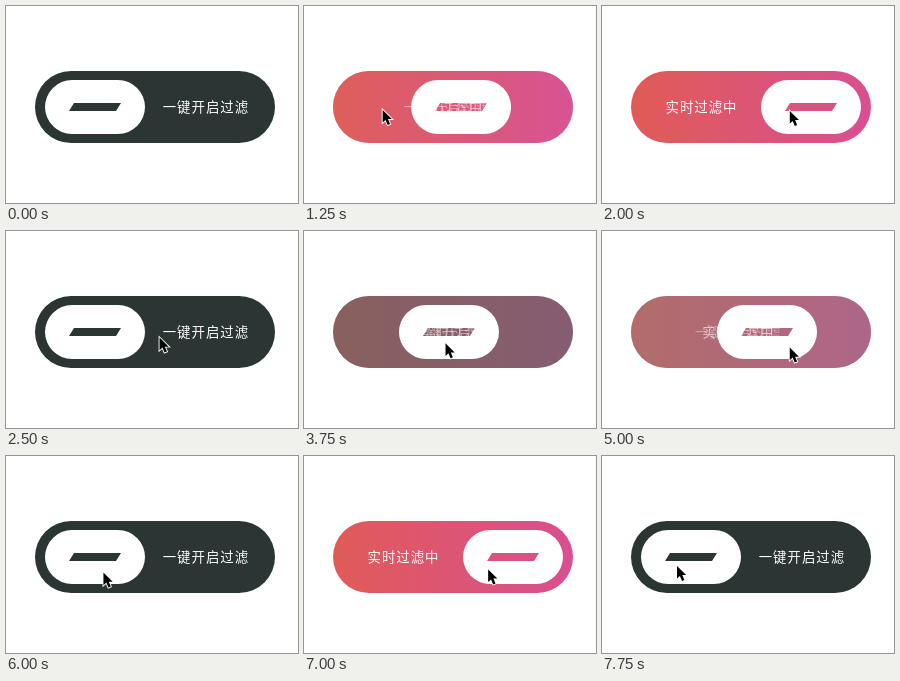
These frames come from a looping animation (292 px wide and 197 px high, 8000 ms). An HTML page:

```html
<!DOCTYPE html>
<html lang="zh-CN">
<head>
<meta charset="utf-8">
<style>
html, body { margin: 0; width: 100%; height: 100%; overflow: hidden; background: #fff; }
svg { display: block; width: 292px; height: 197px; }
text { font: 13.4px "Noto Sans CJK SC", "Noto Sans CJK", sans-serif; letter-spacing: 1px; fill: #fff; text-anchor: middle; }
</style>
</head>
<body>
<svg viewBox="0 0 292 197">
  <defs>
    <linearGradient id="warm">
      <stop stop-color="#e05b57"/>
      <stop offset="1" stop-color="#d94f91"/>
    </linearGradient>
  </defs>
  <rect id="dark" x="29" y="65" width="240" height="72" rx="36" fill="#2b3533"/>
  <rect id="glow" x="29" y="65" width="240" height="72" rx="36" fill="url(#warm)"/>
  <g id="label">
    <text id="offText" y="106.2">一键开启过滤</text>
    <text id="onText" y="106.2">实时过滤中</text>
  </g>
  <!-- knob with a slanted slot that shows the track -->
  <path id="knob" fill="#fff" fill-rule="evenodd"
    d="M27 74H73a27 27 0 0 1 0 54H27a27 27 0 0 1 0-54ZM29 97H76L71 105H24Z"/>
  <path id="cursor" d="M0 0V12.6L2.9 10 5 15 7.4 14 5.3 9.1H9.2Z" stroke="#fff" stroke-width="1.8" paint-order="stroke"/>
</svg>
<script>
const LOOP = 8000, STEP = 250, SLIDE = 400, ENTER = 500;
const LEFT = 75, RIGHT = 188;
// Each click flips the switch, on at the left and off at the right: time, x
const clicks = [
  [1032, LEFT], [2100, RIGHT], [3075, LEFT], [3541, RIGHT],
  [3995, LEFT], [4836, RIGHT], [6450, 88], [7150, RIGHT]
];
const stops = [[ENTER, 92], ...clicks, [7750, LEFT]];

const el = id => document.getElementById(id);
const clamp = v => Math.max(0, Math.min(1, v));
const lerp = (a, b, k) => a + (b - a) * k;
const ease = u => u * u * (3 - 2 * u);
const place = (id, x, y = 0) => el(id).setAttribute("transform", `translate(${x} ${y})`);
const fade = (id, v) => el(id).setAttribute("opacity", v);

function switchAt(t) {
  const i = clicks.findLastIndex(c => c[0] <= t);
  if (i < 0) return { pos: 0, warm: 0 };
  const q = ease(clamp((t - clicks[i][0]) / SLIDE));
  return i % 2
    ? { pos: 1 - q, warm: 1 - clamp(q * 1.25) }
    : { pos: q, warm: clamp(q * 1.7) };
}

// Sweeps between clicks while drifting slowly up and down
function pointerAt(t) {
  const i = stops.findLastIndex(s => s[0] <= t);
  const [t0, x0] = stops[i], [t1, x1] = stops[i + 1] || [LOOP, x0];
  const x = lerp(x0, x1, ease(ease((t - t0) / (t1 - t0))));
  const drift = 110.5 - 6.5 * Math.cos(Math.PI * (t - 1250) / 4250);
  return [x, lerp(46, drift, ease(clamp((t - ENTER) / 500)))];
}

function draw(t) {
  const { pos, warm } = switchAt(t);
  fade("dark", warm === 1 ? 0 : 1 - 0.7 * warm);
  fade("glow", warm);
  fade("offText", 1 - pos);
  fade("onText", pos);
  place("label", lerp(199.9, 99.5, pos));
  place("knob", lerp(39, 159, pos));
  const shown = t >= ENTER;
  fade("cursor", shown ? 1 : 0);
  if (shown) place("cursor", ...pointerAt(t));
}

const start = performance.now();
function tick() {
  const t = (performance.now() - start) % LOOP;
  draw(Math.floor(t / STEP) * STEP);
  requestAnimationFrame(tick);
}
tick();
</script>
</body>
</html>
```
